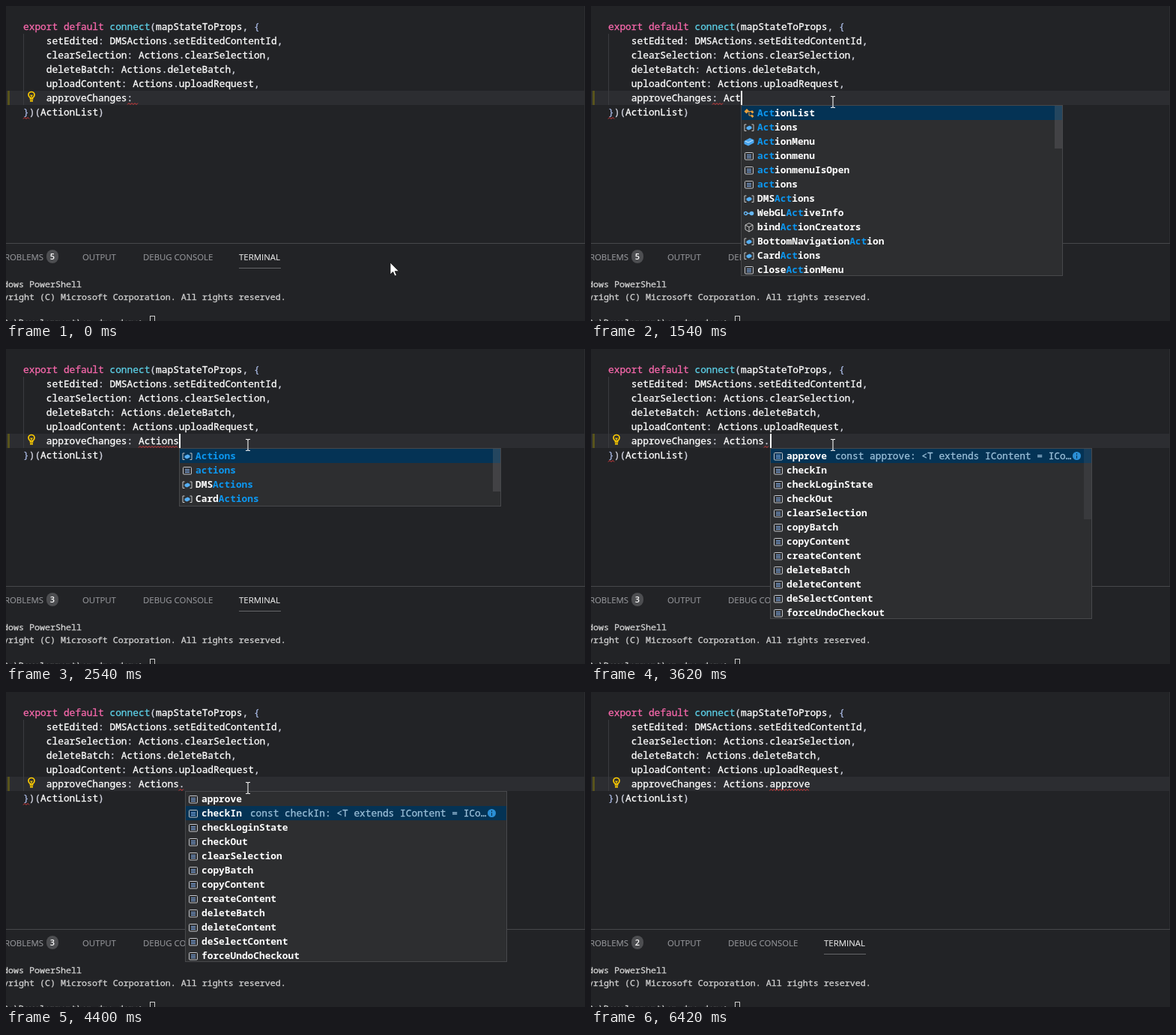
These frames come from a looping animation (773x420 px, 6570 ms). An HTML page:

```html
<!DOCTYPE html>
<html lang="en">
<head>
<meta charset="utf-8">
<title>Editor completion</title>
<style>
html, body { margin: 0; width: 100%; height: 100%; overflow: hidden; background: #222326; }
#stage { position: relative; width: 773px; height: 420px; overflow: hidden; background: #222326; color: #fff;
  font: 500 12.83px/19px "Noto Sans Mono", monospace; -webkit-text-stroke: .3px; }
#stage div, #stage svg { position: absolute; white-space: pre; }
.row { left: 0; width: 773px; height: 19px; }
.code { left: 23px; height: 19px; }
.k { color: #f768ab; } .f { color: #5ccfe6; } .p { color: #d2d4e0; } .b { color: #a9b9e4; }
#line { top: 113px; background: #2c2d31; }
#changed { left: 2px; top: 113px; width: 3px; height: 19px; background: #57531c; }
#guide { left: 23px; top: 37px; width: 1px; height: 95px; background: #3b3c40; }
#edge { left: 772px; top: 0; width: 1px; height: 316px; background: #2d2e31; }
#caret { top: 113px; width: 2px; height: 19px; background: #fff; }
#overlay { left: 0; top: 0; pointer-events: none; }
#panel { left: 0; top: 316px; width: 773px; height: 104px; border-top: 1px solid #47484b; box-sizing: border-box; }
.tab { top: 8px; color: #96979b; font: 400 11.4px/19px "Open Sans", "Noto Sans", sans-serif; -webkit-text-stroke: .1px; }
#terminal { color: #e8e8e8; }
#under { left: 311px; top: 32px; width: 56px; height: 1px; background: #66676a; }
#badge { left: 54px; top: 8px; width: 16px; height: 18px; border-radius: 9px; background: #4d4e51; color: #fff;
  text-align: center; font: 600 11px/18px "Open Sans", "Noto Sans", sans-serif; -webkit-text-stroke: 0; }
.out { left: -25px; height: 17px; color: #d0d0d0; font: 400 11.67px/17px "Noto Sans Mono", monospace; }
#prompt { left: 192px; top: 96px; width: 5px; height: 14px; border: 1px solid #ccc; }
#popup { top: 132px; width: 428px; border: 1px solid #47484b; background: #2d2e30; overflow: hidden; }
#popup .item { left: 0; width: 428px; height: 19px; }
#popup .on { background: #043355; }
#popup .item svg { left: 2px; top: 1.5px; }
#popup .label { left: 21px; font-weight: 600; -webkit-text-stroke: 0; }
#popup .label i { font-style: normal; color: #0c97f0; }
#popup .detail { color: #9cc0da; }
#popup .info { left: 403px; top: 4px; width: 11px; height: 11px; border-radius: 50%; background: #2b8fd6; }
#popup .info::before, #popup .info::after { content: ""; position: absolute; left: 5px; width: 1px; background: #0a304c; }
#popup .info::before { top: 2px; height: 2px; }
#popup .info::after { top: 5px; height: 4px; }
#slider { left: 418px; top: 0; width: 10px; background: #77787c; }
</style>
</head>
<body>
<div id="stage">
  <div id="line" class="row"></div>
  <div id="changed"></div>
  <div id="guide"></div>
  <div id="edge"></div>
  <div id="code"></div>
  <div id="caret"></div>
  <svg id="overlay" width="773" height="420">
    <path id="squiggles" fill="none" stroke="#e23b3b" stroke-width="1"/>
    <g id="bulb" fill="none" stroke="#fc0">
      <path d="M32.5 122.500Q30 121 30 118.500a4 4 0 0 1 8 0Q38 121 35.500 122.500V124H32.500Z" stroke-width="1.700"/>
      <path d="M32.500 118.500L34 120l1.500-1.500M34 120v3.500" stroke-width="1.200"/>
      <path d="M32 126.500h4" stroke-width="2"/>
    </g>
  </svg>
  <div id="panel">
    <div class="tab" style="right:723px">PROBLEMS</div>
    <div id="badge"></div>
    <div class="tab" style="left:102px">OUTPUT</div>
    <div class="tab" style="left:183px">DEBUG CONSOLE</div>
    <div class="tab" id="terminal" style="left:311px">TERMINAL</div>
    <div id="under"></div>
    <div class="out" style="top:45px">Windows PowerShell</div>
    <div class="out" style="top:62px">Copyright (C) Microsoft Corporation. All rights reserved.</div>
    <div class="out" style="top:96px">PS D:\Development\sn-dms-demo&gt;</div>
    <div id="prompt"></div>
  </div>
  <div id="popup"></div>
  <svg id="mouse" width="20" height="24" viewBox="-8 -9 20 24" style="overflow:visible">
    <path id="arrow" d="M0 0V16L3.700 12.500 6 18 8.500 17 6.200 11.700H11.500Z" fill="#fff" stroke="#111" stroke-width=".8"/>
    <path id="beam" d="M-3-7.500H-1L0-6.500 1-7.500H3M0-6.500V6.500M-3 7.500H-1L0 6.500 1 7.500H3" fill="none" stroke="#f2f2f2" stroke-width="1.100"/>
  </svg>
</div>
<script>
const LOOP = 6570, CHAR = 7.698, LEFT = 23, WORD = LEFT + 20 * CHAR;
const $ = id => document.getElementById(id);

const lines = [
  "export default connect(mapStateToProps, {",
  "    setEdited: DMSActions.setEditedContentId,",
  "    clearSelection: Actions.clearSelection,",
  "    deleteBatch: Actions.deleteBatch,",
  "    uploadContent: Actions.uploadRequest,",
  "    approveChanges: ",
  "})(ActionList)"
];

const icons = {
  wrench: '<path d="M3 13.500L8.500 8" stroke="#d0d0d0" stroke-width="2.600" stroke-linecap="round"/><path d="M13.800 4.300a3.800 3.800 0 1 1-3.700-2.500L9.300 4.700l2 1.700z" fill="#d0d0d0"/>',
  class: '<path d="M4.500 5.500H11M8 5.500V11h3" fill="none" stroke="#e8a03c"/><path d="M1.500 5.500l3.500-3.500 3 3L4.500 8.500zM10 6l2-2 2.500 2.500-2 2zM10 11.500l2-2 2.500 2.500-2 2z" fill="#e8a03c"/>',
  variable: '<path d="M4.500 4H2v8.500h2.500M11.500 4H14v8.500h-2.500" fill="none" stroke="#c5c5c5"/><path d="M4.500 7.500L8.500 5.500l3 1.500v2.500L7.500 11.500l-3-1.500z" fill="#55aef2"/>',
  field: '<path d="M1.500 7L9 3l5.500 2.500V9.500L7 13.500 1.500 11z" fill="#4ba6ee"/><path d="M3 7.200L7 9l6-3" fill="none" stroke="#cfe9ff"/>',
  text: '<rect x="2.500" y="3.500" width="11" height="9.500" rx="1" fill="none" stroke="#c2c4c8"/><path d="M5 6.500h6M5 8.500h6M5 10.500h6" stroke="#7ca6e0"/>',
  interface: '<path d="M5 8.500h5" stroke="#66b7f3" stroke-width="1.500"/><circle cx="3.500" cy="8.500" r="2" fill="none" stroke="#66b7f3" stroke-width="1.300"/><circle cx="11.500" cy="8.500" r="2.800" fill="#66b7f3"/>',
  cube: '<path d="M8 2.500l5 2.500v6L8 14 3 11V5zM3 5l5 2.800L13 5M8 7.800V14" fill="none" stroke="#c5c5c5"/>'
};

const entries = (kind, names) => names.split(" ").map(name => ({ name, kind }));
const emmet = entries("wrench", "A:link A:mail A:tel Abbr Acr Acronym Adr Area Area:c Area:d Area:p Area:r");
const symbols = [
  ["class", "ActionList"], ["variable", "Actions"], ["field", "ActionMenu"],
  ["text", "actionmenu actionmenuIsOpen actions"], ["variable", "DMSActions"],
  ["interface", "WebGLActiveInfo"], ["cube", "bindActionCreators"],
  ["variable", "BottomNavigationAction CardActions"], ["text", "closeActionMenu"]
].flatMap(group => entries(...group));
const members = entries("text", "approve checkIn checkLoginState checkOut clearSelection copyBatch copyContent " +
  "createContent deleteBatch deleteContent deSelectContent forceUndoCheckout");

// Each step changes part of the editor state from its time on.
const start = { text: "", list: null, at: 0, sel: 0, caret: 0, bulb: 1, brace: 1, mark: "colon", count: 5 };
const steps = [
  [530, { caret: 1 }],
  [1000, { text: "A" }],
  [1140, { list: emmet, at: 1 }],
  [1220, { text: "Ac" }],
  [1300, { list: symbols, at: 2 }],
  [1460, { text: "Act", at: 3 }],
  [1540, { bulb: 0 }],
  [1690, { brace: 0, mark: "" }],
  [1770, { mark: "word" }],
  [1850, { count: 3 }],
  [2000, { caret: 0, bulb: 1 }],
  [2230, { text: "Acti", at: 4, caret: 1 }],
  [2310, { text: "Actio", at: 5 }],
  [2460, { text: "Action", at: 6 }],
  [2540, { text: "Actions", at: 7 }],
  [2620, { text: "Actions.", list: null }],
  [2690, { list: members, at: 8 }],
  [2860, { mark: "", bulb: 0 }],
  [2930, { count: 2 }],
  [3000, { brace: 1, mark: "dot", count: 3 }],
  [3080, { bulb: 1 }],
  [3150, { caret: 0 }],
  [3620, { caret: 1 }],
  [3700, { sel: 1 }],
  [3870, { sel: 2 }],
  [4020, { sel: 3 }],
  [4080, { caret: 0 }],
  [4250, { sel: 2 }],
  [4400, { sel: 1 }],
  [4570, { sel: 0, caret: 1 }],
  [4950, { text: "Actions.approve", list: null }],
  [5180, { brace: 0, mark: "member", bulb: 0 }],
  [5270, { count: 2 }],
  [5410, { caret: 0 }],
  [5490, { bulb: 1 }],
  [5870, { caret: 1 }],
  [6420, { caret: 0 }]
];

const paint = line => line
  .replace(/[{}]|[():,.]/g, c => `<span class="${/[{}]/.test(c) ? "b" : "p"}">${c}</span>`)
  .replace(/export default/, '<span class="k">$&</span>')
  .replace(/connect/, '<span class="f">$&</span>');

$("code").innerHTML = lines.map((line, i) =>
  `<div class="code" style="left:${LEFT}px;top:${18 + 19 * i}px">${paint(line)}</div>`).join("");
const active = $("code").children[5];

function wave(from, to, y) {
  let d = `M${from} ${y + 2}`;
  for (let x = from + 2, up = true; x <= to; x += 2, up = !up) d += `L${x} ${up ? y : y + 2}`;
  return d;
}

function detailFor(item) {
  if (item.kind === "wrench") return ["Emmet Abbreviation", "right:29px"];
  const { name } = item;
  const type = name === "checkLoginState" ? "() => { type: string" : "<T extends IContent = IContent>";
  const full = `const ${name}: ${type}`.slice(0, 47 - name.length) + "…";
  return [full.replace("<", "&lt;"), `left:${21 + name.length * CHAR + 11}px`];
}

function drawPopup({ list, at, sel, text }) {
  const popup = $("popup");
  popup.style.display = list ? "" : "none";
  if (!list) return;
  const typed = text.split(".").pop();
  const match = typed && new RegExp(list === emmet ? typed[0] : typed, "i");
  const shown = list === symbols ? list.filter(item => match.test(item.name)) : list;
  popup.style.left = Math.round(WORD + at * CHAR) + "px";
  popup.style.height = Math.min(226, shown.length * 19) + "px";
  popup.innerHTML = shown.map((item, i) => {
    const on = i === sel;
    const label = match ? item.name.replace(match, "<i>$&</i>") : item.name;
    let extra = "";
    if (on && list !== symbols) {
      const [detail, place] = detailFor(item);
      extra = `<div class="detail" style="${place}">${detail}</div><div class="info"></div>`;
    }
    return `<div class="item ${on ? "on" : ""}" style="top:${19 * i}px">` +
      `<svg width="16" height="16">${icons[item.kind]}</svg><div class="label">${label}</div>${extra}</div>`;
  }).join("") + (list === emmet ? "" : `<div id="slider" style="height:${list === members ? 94 : 57}px"></div>`);
}

function draw(s) {
  const end = WORD + s.text.length * CHAR;
  active.innerHTML = paint(lines[5] + s.text);
  $("caret").style.left = Math.round(end) + "px";
  $("caret").style.opacity = s.caret;
  $("bulb").style.opacity = s.bulb;
  $("badge").textContent = s.count;
  const span = {
    colon: [162, 177],
    word: [177, end],
    dot: [WORD + 7 * CHAR, WORD + 8 * CHAR],
    member: [WORD + 8 * CHAR, end]
  }[s.mark];
  $("squiggles").setAttribute("d", (span ? wave(...span, 129.5) : "") + (s.brace ? wave(23, 31, 148.5) : ""));
  drawPopup(s);
}

function pointer(t) {
  if (t < 70) return [513, 342];
  if (t < 530) {
    const p = Math.min(1, Math.floor((t - 70) / 77.5 + 1) / 5);
    const e = p * p * (3 - 2 * p);
    return [513 - 190.5 * e, 342 - 204 * e];
  }
  if (t < 5720) return [322.5, 128 + 10 * Math.max(0, 1 - Math.floor((t - 530) / 76 + 1) / 4)];
  if (t < 5795) return [480, 165];
  return t < 5870 ? [745.5, 227] : null;
}

function drawMouse(t) {
  const at = pointer(t), mouse = $("mouse");
  mouse.style.display = at ? "" : "none";
  if (!at) return;
  mouse.style.left = at[0] - 8 + "px";
  mouse.style.top = at[1] - 9 + "px";
  $("arrow").style.display = at[1] > 316 ? "" : "none";
  $("beam").style.display = at[1] > 316 ? "none" : "";
}

let last = -1;
const begin = performance.now();
function tick() {
  const t = Math.max(0, performance.now() - begin) % LOOP;
  const done = steps.filter(([time]) => time <= t);
  if (done.length !== last) {
    last = done.length;
    draw(Object.assign({}, start, ...done.map(step => step[1])));
  }
  const slider = $("slider");
  if (slider) slider.style.opacity = .28 * Math.max(0, Math.min(1, (3950 - t) / 550));
  drawMouse(t);
  requestAnimationFrame(tick);
}
tick();
</script>
</body>
</html>
```
